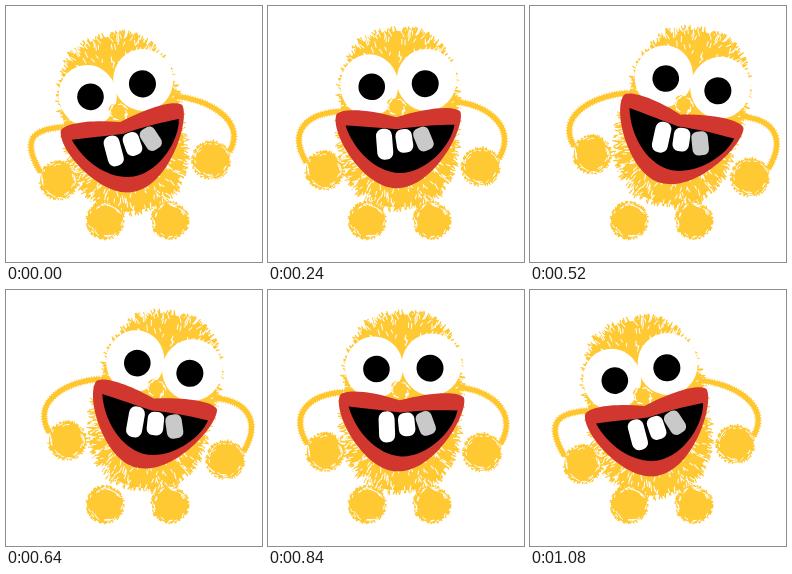
An HTML page that plays this animation: 256 by 256 pixels, repeating every 1.12 s.

```html
<!DOCTYPE html>
<html lang="en">
<head>
<meta charset="utf-8">
<title>Swaying furry monster</title>
<style>
  html, body { margin: 0; width: 100%; height: 100%; overflow: hidden; background: #fff; }
  svg { display: block; width: 100vw; height: 100vh; }
  .fill { fill: #ffc933; }
  .fur { fill: none; stroke: #ffc62e; stroke-width: 1.2; stroke-linecap: round; }
  .streak { fill: none; stroke: #fff; stroke-width: 1; stroke-linecap: round; }
  .arm { fill: none; stroke: #ffc62e; stroke-width: 5; }
  .fuzz { fill: none; stroke: #ffc62e; stroke-width: 7; stroke-dasharray: .9 1.6; }
</style>
</head>
<body>
<svg viewBox="0 0 256 256">
  <g id="body"></g>
  <g id="feet"></g>
  <g id="arms">
    <path class="fuzz left"/><path class="arm left"/>
    <path class="fuzz right"/><path class="arm right"/>
  </g>
  <g id="face">
    <ellipse cx="102" cy="79" rx="29" ry="31" fill="#fff"/>
    <ellipse cx="159.5" cy="74" rx="30" ry="31" fill="#fff"/>
    <circle cx="104.5" cy="80.5" r="13.3"/>
    <circle cx="158" cy="77.7" r="13.5"/>
    <g id="nose"></g>
    <path fill="#d1372e" d="M69 108C74 101 102 103 129 111C158 102 187 99 193 106C198 122 166 182 129 182C96 183 62 126 69 108Z"/>
    <path d="M78 119C95 120 114 122 130 123C150 120 170 119 187 119C184 139 159 167 132 167C108 166 86 144 78 119Z"/>
    <g fill="#fff">
      <rect x="109" y="122.5" width="16" height="31" rx="7" transform="rotate(-4 117 138)"/>
      <rect x="128.5" y="123" width="16.5" height="23.5" rx="6.5" transform="rotate(-8 137 135)"/>
      <rect x="147.5" y="121" width="16.5" height="24" rx="6" fill="#c9c9c9" transform="rotate(-22 156 133)"/>
    </g>
  </g>
  <g id="leftHand"></g>
  <g id="rightHand"></g>
</svg>
<script>
const PIVOT = { x: 131, y: 188 };
const STEP = 40, STEPS = 28;
// Lean in degrees at chosen steps of the half swing.
const LEAN = [[0, -11], [1, -10.8], [3, -8], [5, -4.7], [6, -0.4], [8, 4.6], [10, 9.4], [13, 16.3], [14, 17]];

const $ = selector => document.querySelector(selector);
let seed = 17;
const random = () => (seed = seed * 16807 % 2147483647) / 2147483647;
const between = (a, b) => a + random() * (b - a);

const hair = (x, y, angle, length) =>
  `M${x.toFixed(1)} ${y.toFixed(1)}l${(Math.cos(angle) * length).toFixed(1)} ${(Math.sin(angle) * length).toFixed(1)}`;
const hairs = (count, make) => Array.from({ length: count }, make).join('');

function bodyPoint(angle, scale = 1) {
  const bulge = v => Math.sign(v) * Math.abs(v) ** (2 / 2.5);
  return [131 + 58 * scale * bulge(Math.cos(angle)), 113 + 88 * scale * bulge(Math.sin(angle))];
}

// Hairs that grow outward, rooted inside a band of the body and a range of angles.
function coat(count, [from, to], [inner, outer], [short, long]) {
  return hairs(count, () => {
    const a = between(from, to), [x, y] = bodyPoint(a, between(inner, outer));
    return hair(x, y, a + between(-.5, .5), between(short, long));
  });
}

function drawBody() {
  const outline = Array.from({ length: 72 }, (_, i) => bodyPoint(i * Math.PI / 36).map(v => v.toFixed(1)).join(' '));
  const all = [0, 2 * Math.PI];
  const edge = coat(380, all, [.96, .98], [3, 8]);
  const light = coat(90, all, [.93, 1.01], [3, 6])
    + coat(190, [-.15, Math.PI + .15], [.6, .96], [2.5, 6.5])
    + coat(70, [-2.4, -.75], [.6, .95], [3, 6]);
  $('#body').innerHTML = `<path class="fill" d="M${outline.join('L')}Z"/><path class="fur" d="${edge}"/>
    <path class="streak" d="${light}"/>`;
}

function ball(x, y, r, marks) {
  const fringe = hairs(Math.round(r * 4), () => {
    const a = between(0, 2 * Math.PI);
    return hair(x + (r - 1.5) * Math.cos(a), y + (r - 1.5) * Math.sin(a), a + between(-.5, .5), between(1, 2));
  });
  const curls = hairs(marks, () => {
    const a = between(0, 2 * Math.PI), d = r * between(.76, .92);
    return hair(x + d * Math.cos(a), y + d * Math.sin(a), a + Math.PI / 2 + between(-.3, .3), between(2, 5));
  });
  return `<circle class="fill" cx="${x}" cy="${y}" r="${r - 1}"/><path class="fur" d="${fringe}"/><path class="streak" d="${curls}"/>`;
}

function leanAt(step) {
  const s = Math.min(step, STEPS - step);
  const i = Math.max(1, LEAN.findIndex(([at]) => at >= s));
  const [s0, a0] = LEAN[i - 1], [s1, a1] = LEAN[i];
  return a0 + (a1 - a0) * (s - s0) / (s1 - s0);
}

function shoulder(x, y, lean, lift) {
  const a = lean * Math.PI / 180, dx = x - PIVOT.x, dy = y - PIVOT.y;
  return [PIVOT.x + dx * Math.cos(a) - dy * Math.sin(a), PIVOT.y + lift + dx * Math.sin(a) + dy * Math.cos(a)];
}

function drawArm(side, dir, [x, y], hand) {
  const d = `M${x} ${y}C${x + dir * 32} ${y + 2} ${hand.x + dir * 37} ${hand.y - 40} ${hand.x + dir * 18} ${hand.y - 8}`;
  document.querySelectorAll('#arms .' + side).forEach(path => path.setAttribute('d', d));
}

function render(time) {
  const lean = leanAt(Math.floor(time / STEP) % STEPS);
  const lift = -.3 * lean;
  const left = { x: 56.5 + .35 * lean, y: 164 - .95 * lean };
  const right = { x: 213 + .6 * lean - .01 * lean * lean, y: 161 + .63 * lean };
  const tilt = `translate(0 ${lift}) rotate(${lean} ${PIVOT.x} ${PIVOT.y})`;
  $('#body').setAttribute('transform', tilt);
  $('#face').setAttribute('transform', tilt);
  $('#leftHand').setAttribute('transform', `translate(${left.x} ${left.y})`);
  $('#rightHand').setAttribute('transform', `translate(${right.x} ${right.y})`);
  drawArm('left', -1, shoulder(72, 105, lean, lift), left);
  drawArm('right', 1, shoulder(187, 96, lean, lift), right);
}

drawBody();
$('#feet').innerHTML = ball(99, 214.5, 19, 26) + ball(164, 214.5, 19, 26);
$('#nose').innerHTML = ball(129, 100.5, 9.5, 16);
$('#leftHand').innerHTML = ball(0, 0, 19.5, 26);
$('#rightHand').innerHTML = ball(0, 0, 19.5, 26);

const start = performance.now();
function tick() {
  render(performance.now() - start);
  requestAnimationFrame(tick);
}
tick();
</script>
</body>
</html>
```
